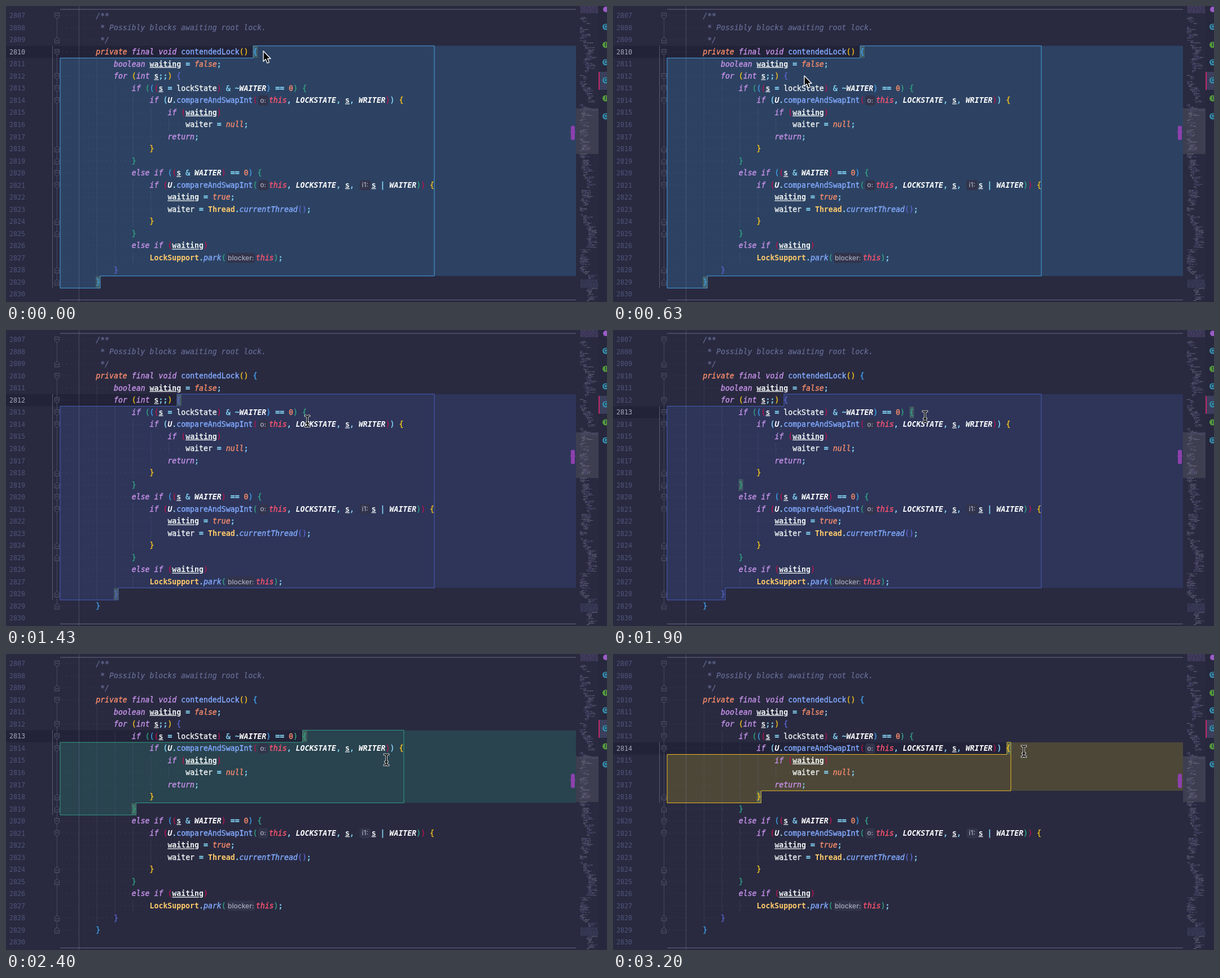
Recreate the animation shown at these times as an HTML page. Size 1065 px wide and 526 px high, loop 3.23 s.

```html
<!DOCTYPE html>
<html lang="en">
<head>
<meta charset="utf-8">
<title>Code block selection</title>
<style>
  html, body { margin: 0; width: 100%; height: 100%; overflow: hidden; background: #292a40; }
  svg { display: block; width: 100vw; height: 100vh; }
  text { white-space: pre; }
  .code { font: 13.205px "DejaVu Sans Mono", monospace; stroke: currentColor; stroke-width: .38px; fill: currentColor; }
  .num { font: 11.7px "DejaVu Sans Mono", monospace; }
  .hint { font: 500 12px Inter, sans-serif; fill: #a9abbd; }
  .it { font-style: italic; }
  .doc { font-style: italic; stroke-width: .2px; }
  .bold { font-weight: bold; stroke: none; }
  .under { text-decoration: underline; }
</style>
</head>
<body>
<svg id="stage" viewBox="0 0 1065 526" preserveAspectRatio="none"></svg>
<script>
const LOOP = 3230, FIRST = 2807, ROW = 21.52, TOP = 6.3, COL = 7.95, LEFT = 95.6, EDGE = 1010;
const rowY = n => TOP + (n - FIRST) * ROW;
const colX = c => LEFT + c * COL;
const stage = document.getElementById('stage');

function add(tag, attrs, parent = stage, text) {
  const el = document.createElementNS('http://www.w3.org/2000/svg', tag);
  for (const k in attrs) el.setAttribute(k, attrs[k]);
  if (text !== undefined) el.textContent = text;
  parent.appendChild(el);
  return el;
}
const rect = (x, y, width, height, fill, more = {}) =>
  add('rect', { x, y, width, height, fill, ...more });
const line = (x1, y1, x2, y2, stroke, more = {}) =>
  add('line', { x1, y1, x2, y2, stroke, ...more });

// Each line: indent, text, bracket colours in reading order; [x] is a parameter hint.
const source = [
  [8, '/**'],
  [9, '* Possibly blocks awaiting root lock.'],
  [9, '*/'],
  [8, 'private final void contendedLock() {', 'yyb'],
  [12, 'boolean waiting = false;'],
  [12, 'for (int s;;) {', 'yyi'],
  [16, 'if (((s = lockState) & ~WAITER) == 0) {', 'gbrrbgg'],
  [20, 'if (U.compareAndSwapInt([o:]this, LOCKSTATE, s, WRITER)) {', 'crrcy'],
  [24, 'if (waiting)', 'rr'],
  [28, 'waiter = null;'],
  [24, 'return;'],
  [20, '}', 'y'],
  [16, '}', 'g'],
  [16, 'else if ((s & WAITER) == 0) {', 'brrbg'],
  [20, 'if (U.compareAndSwapInt([o:]this, LOCKSTATE, s, [i1:]s | WAITER)) {', 'rggry'],
  [24, 'waiting = true;'],
  [24, 'waiter = Thread.currentThread();', 'ii'],
  [20, '}', 'y'],
  [16, '}', 'g'],
  [16, 'else if (waiting)', 'rr'],
  [20, 'LockSupport.park([blocker:]this);', 'gg'],
  [12, '}', 'i'],
  [8, '}', 'b'],
  [0, '']
];
const bracket = { c: '#89ddff', b: '#409eea', i: '#5866ce', y: '#f2c01e', g: '#32a184', r: '#b3164f' };
const hintWidth = { 'o:': 20.5, 'i1:': 22.8, 'blocker:': 53 };
const styles = [
  [/^(private|false|true|null)$/, '#f78c6c', 'it'],
  [/^(final|void|boolean|for|int|if|else|return)$/, '#c792ea', 'it'],
  [/^this$/, '#ff5370', 'it'],
  [/^\d+$/, '#f78c6c', ''],
  [/^(waiting|s)$/, '#eef3f2', 'bold under'],
  [/^(U|[A-Z]{3,})$/, '#fff', 'it bold'],
  [/^(Thread|LockSupport)$/, '#ffcb6b', 'bold'],
  [/^(currentThread|park)$/, '#82aaff', 'it'],
  [/^(contendedLock|compareAndSwapInt)$/, '#82aaff', ''],
  [/^\w+$/, '#eef3f2', ''],
  [/./, '#89ddff', '']
];

function drawLine([indent, text, colours = ''], i) {
  const base = rowY(FIRST + i) + 15.3;
  const put = (x, str, color, cls) =>
    add('text', { x, y: base, class: 'code ' + cls, style: 'color:' + color }, stage, str);
  if (indent) line(99, base - 4.6, colX(indent) - 2, base - 4.6, '#747da8',
    { 'stroke-dasharray': '1 6.95', 'stroke-opacity': .4 });
  let x = colX(indent), n = 0;
  if (i < 3) return put(x, text, '#676e95', 'doc');
  for (const tok of text.match(/\[[^\]]+\]|\w+|\s+|==|./g) || []) {
    if (tok[0] === '[') {
      const label = tok.slice(1, -1), w = hintWidth[label];
      rect(x + 1.6, base - 13.5, w - 3, 18, '#31344b', { rx: 4 });
      add('text', { x: x + w / 2, y: base - .4, class: 'hint', 'text-anchor': 'middle' }, stage, label);
      x += w;
      continue;
    }
    if (/[(){}]/.test(tok)) put(x, tok, bracket[colours[n++]], '');
    else if (tok.trim()) {
      const [, color, cls] = styles.find(s => s[0].test(tok));
      put(x, tok, color, cls);
    }
    x += tok.length * COL;
  }
}

const blocks = [
  { a: 2810, b: 2829, x1: 438, x2: 167, right: 759, fill: '#2d4262', edge: '#479fe0' },
  { a: 2812, b: 2828, x1: 303, x2: 199, right: 759, fill: '#2e3559', edge: '#485dba' },
  { a: 2813, b: 2819, x1: 525.5, x2: 230.5, right: 705, fill: '#29434f', edge: '#329b83' },
  { a: 2814, b: 2818, x1: 698, x2: 262.5, right: 705, fill: '#4d4738', edge: '#ecbb24' }
];
const outline = (k, right) =>
  `M${k.x1} ${rowY(k.a)}H${right}V${rowY(k.b)}H${k.x2}V${rowY(k.b + 1)}H96V${rowY(k.a + 1)}H${k.x1}Z`;

// Backdrop and block highlights
rect(0, 0, 1065, 526, '#292a40');
const caretRow = rect(0, 0, EDGE, ROW, '#222338');
line(96, 6, EDGE, 6, '#686a83');
line(96, 522.3, EDGE, 522.3, '#686a83');
const fill = add('path', {});
const edge = add('path', { fill: 'none', 'stroke-width': 1 });
const braces = [0, 1].map(() => rect(0, 0, COL, ROW - 1, '#628b70', { 'fill-opacity': .42 }));

// Indent guides: column, first row, last row
line(129.3, 0, 129.3, 526, '#8a91b8', { 'stroke-opacity': .33 });
for (const [c, a, b] of [[8, 2811, 2828], [12, 2813, 2827], [16, 2814, 2818], [16, 2821, 2824],
  [16, 2827, 2827], [20, 2815, 2817], [20, 2822, 2823], [24, 2816, 2816]])
  line(colX(c) + 2, rowY(a), colX(c) + 2, rowY(b + 1), '#8a91b8', { 'stroke-opacity': .15 });

// Gutter
line(90.3, 17, 90.3, 60, '#464963');
line(90.3, 82, 90.3, 490, '#464963');
const scope = line(82.5, 0, 82.5, 0, '#585b76');
const numbers = source.map((_, i) =>
  add('text', { x: 6, y: rowY(FIRST + i) + 15, class: 'num' }, stage, FIRST + i));
function marker(n, dir) {
  const g = add('g', { transform: `translate(90.3 ${rowY(n) + ROW / 2 + .5}) scale(1 ${dir})`,
    fill: '#292a40', stroke: '#5c5f7a', 'stroke-width': .9 });
  add('path', { d: 'M-4-5H4V1.5L0 5.2L-4 1.5Z' }, g);
  add('path', { d: 'M-2-1H2' }, g);
}
[2807, 2810, 2812, 2813, 2814, 2820, 2821].forEach(n => marker(n, 1));
[2809, 2818, 2819, 2824, 2825, 2828, 2829].forEach(n => marker(n, -1));

source.forEach(drawLine);

// Minimap
rect(EDGE, 0, 40, 526, '#292a40');
rect(EDGE, 182, 40, 81, '#3d3e50');
let seed = 41;
const rand = () => (seed = (seed * 16807) % 2147483647) / 2147483647;
const ink = { '#9b9db2': '', '#7f6aa8': '', '#5d608a': '' };
let depth = 1;
for (let y = 1; y < 525; y += 2.15) {
  const wide = y < 13 || (y > 486 && y < 500) || (y > 183 && y < 188);
  if (!wide && rand() < .1) { depth = 0; continue; }
  depth = Math.max(0, Math.min(5, depth + Math.floor(rand() * 3) - 1 + (rand() < .25)));
  let x = 1017 + (wide ? 1 : depth * 3);
  const end = wide ? 1049 : Math.min(1048, x + 3 + rand() * 15);
  while (x < end) {
    const w = Math.min(1 + rand() * 5, end - x), r = rand();
    ink[wide || r < .35 ? (y < 13 ? '#7f6aa8' : '#5d608a') : r < .5 ? '#7f6aa8' : '#9b9db2'] +=
      `M${x.toFixed(1)} ${y.toFixed(1)}h${w.toFixed(1)}`;
    x += w + .8;
  }
}
for (const c in ink) add('path', { d: ink[c], stroke: c, 'stroke-opacity': .6 });
rect(1001, 213, 7, 25, '#8d40ac', { rx: 2 });
line(999, 224, 1010, 224, '#8d40ac');

// Side tabs
rect(1050, 0, 15, 526, '#27283d');
rect(1050, 117, 15, 32, '#3b3f5c');
rect(1050, 117, 2, 32, '#c3266b');
add('circle', { cx: 1063, cy: 6, r: 5, fill: '#9a5cc6' });
[37, 69, 100, 132, 164, 196].forEach((cy, i) => {
  const green = i === 1 || i === 4;
  add('circle', { cx: 1062.5, cy, r: 5.5, fill: green ? '#559a3c' : '#3690ac' });
  add('text', { x: 1062.5, y: cy + 3.2, 'text-anchor': 'middle', fill: '#25324b',
    style: 'font:bold 9px Inter,sans-serif' }, stage, green ? 'I' : 'C');
});

// Pointers
const arrow = add('path', { d: 'M0 0V18.5L4.2 14.6L7 21.5L10.3 20.1L7.5 13.5H13Z',
  fill: '#080808', stroke: '#fff', 'stroke-width': 1.3, 'stroke-linejoin': 'round' });
const beam = add('g', { fill: 'none', 'stroke-linecap': 'square' });
const beamShape = 'M-3.5-9.5H-2L0-8L2-9.5H3.5M0-8V8M-3.5 9.5H-2L0 8L2 9.5H3.5M-2 3.5H2';
add('path', { d: beamShape, stroke: '#fff', 'stroke-width': 3.4 }, beam);
add('path', { d: beamShape, stroke: '#080808', 'stroke-width': 1.8 }, beam);

const path = [[0, 456, 80], [130, 456, 80], [530, 341, 122], [630, 339, 124], [800, 336, 126],
  [1050, 336, 126], [1430, 534, 162], [1700, 553, 154], [2050, 553, 154], [2400, 674, 188],
  [2780, 728, 173], [LOOP, 728, 173]];
const caretTimes = [0, 740, 1865, 2930], blockTimes = [0, 820, 1965, 3030], beamTime = 1080;
const latest = (times, t) => times.filter(s => s <= t).length - 1;

function pointerAt(t) {
  const i = Math.max(1, path.findIndex(p => p[0] > t));
  const [t0, x0, y0] = path[i - 1], [t1, x1, y1] = path[i];
  const u = (t - t0) / (t1 - t0), e = u * u * (3 - 2 * u);
  return [x0 + (x1 - x0) * e, y0 + (y1 - y0) * e];
}
function set(el, attrs) { for (const k in attrs) el.setAttribute(k, attrs[k]); }

function render(t) {
  const caret = blocks[latest(caretTimes, t)], block = blocks[latest(blockTimes, t)];
  set(caretRow, { y: rowY(caret.a) });
  set(fill, { d: outline(block, EDGE), fill: block.fill });
  set(edge, { d: outline(block, block.right), stroke: block.edge });
  set(braces[0], { x: caret.x1, y: rowY(caret.a) + .5 });
  set(braces[1], { x: caret.x2 - COL, y: rowY(caret.b) + .5 });
  set(scope, { y1: rowY(caret.a), y2: rowY(caret.b + 1) });
  numbers.forEach((el, i) => set(el, { fill: FIRST + i === caret.a ? '#a5a8c4' : '#50547a' }));
  const move = `translate(${pointerAt(t).join(' ')})`, isBeam = t >= beamTime;
  set(arrow, { transform: move, visibility: isBeam ? 'hidden' : 'visible' });
  set(beam, { transform: move, visibility: isBeam ? 'visible' : 'hidden' });
}

const start = performance.now();
function tick() {
  render((performance.now() - start) % LOOP);
  requestAnimationFrame(tick);
}
tick();
</script>
</body>
</html>
```
